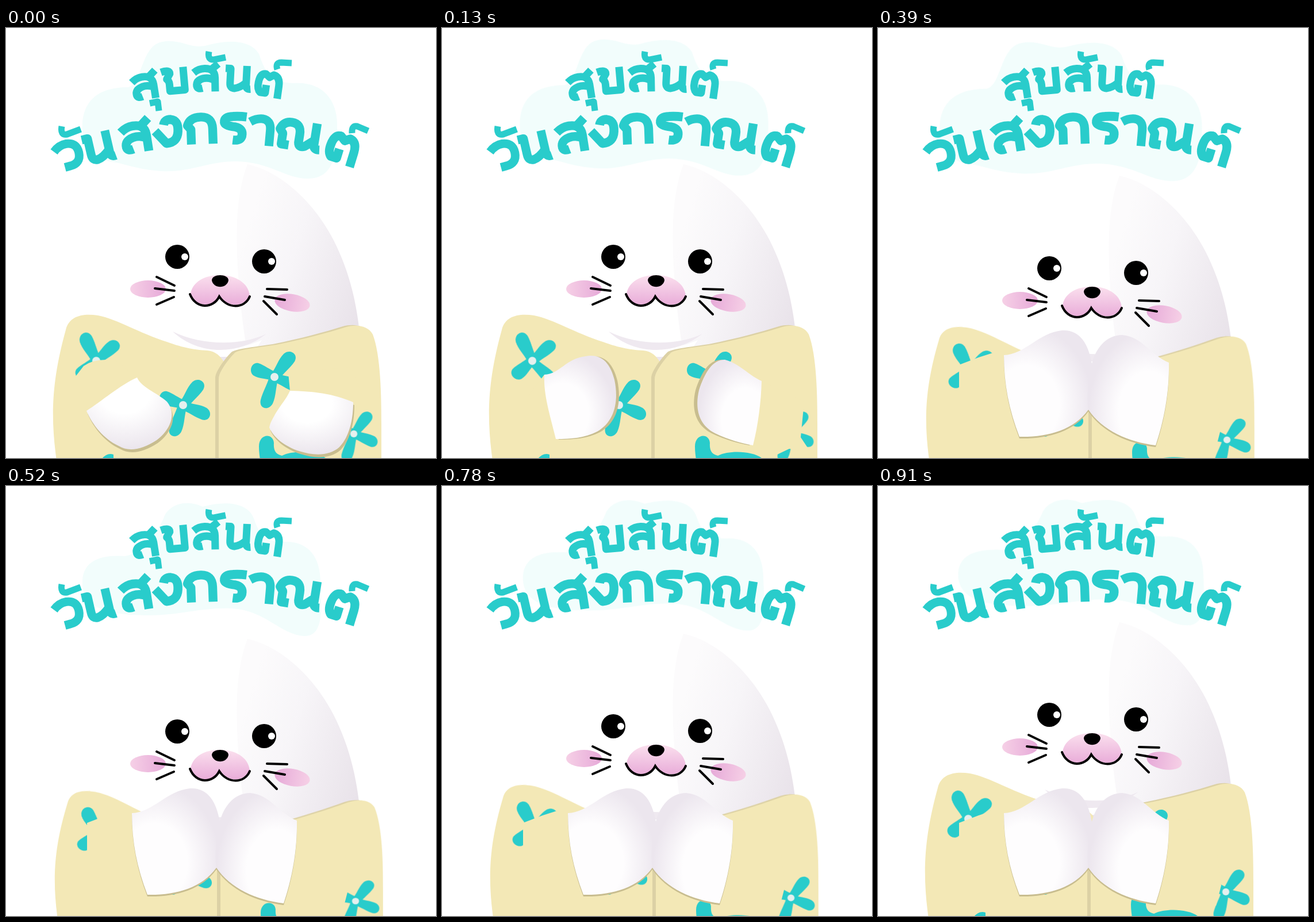
An HTML page without scripts for the animation above (1.04 s loop, 748 px wide and 748 px high).

```html
<!DOCTYPE html>
<html lang="th">
<head>
<meta charset="utf-8">
<title>สุขสันต์วันสงกราณต์</title>
<style>
html, body { margin: 0; width: 100%; height: 100%; overflow: hidden; background: #fff; }
svg { display: block; width: 100%; height: 100%; }
.anim { animation: 1040ms step-end infinite; }
.bow { animation-name: bow; }
.coat { animation-name: squash; transform-origin: 370px 925px; }
.panel-left { animation-name: droop-left; transform-origin: 130px 0; }
.panel-right { animation-name: droop-right; transform-origin: 600px 0; }
.rest { animation-name: rest; }
.lift { animation-name: lift; }
.wai { animation-name: wai; }
.cloud { fill: #f2fdfc; transform-origin: 355px 140px; }
.cloud-a { animation-name: cloud-a; }
.cloud-b { animation-name: cloud-b; }
.line { fill: none; stroke: #000; stroke-width: 4; stroke-linecap: round; }
.letters { fill: none; stroke: #29cccb; stroke-width: 13; stroke-linejoin: round; }
.marks { stroke-width: 11; }
.cloth { fill: #f3e8b6; }
.print { fill: #29cccb; }
@keyframes bow {
  0%, 87.5% { transform: none; }
  37.5%, 75% { transform: translateY(20px); }
  50%, 62.5% { transform: translateY(29px); }
}
@keyframes squash {
  0%, 87.5% { transform: none; }
  37.5%, 75% { transform: translateX(2px) scaleY(.952); }
  50%, 62.5% { transform: translateX(3px) scaleY(.927); }
}
@keyframes droop-left {
  0%, 87.5% { transform: none; }
  37.5%, 75% { transform: skewY(4deg); }
  50%, 62.5% { transform: skewY(6deg); }
}
@keyframes droop-right {
  0%, 87.5% { transform: none; }
  37.5%, 75% { transform: skewY(-4deg); }
  50%, 62.5% { transform: skewY(-4.5deg); }
}
@keyframes rest { 0% { visibility: visible; } 12.5%, 100% { visibility: hidden; } }
@keyframes lift { 0%, 25%, 100% { visibility: hidden; } 12.5% { visibility: visible; } }
@keyframes wai { 0% { visibility: hidden; } 25%, 100% { visibility: visible; } }
@keyframes cloud-a {
  0% { visibility: visible; transform: none; }
  12.5% { visibility: visible; transform: translate(-3px, -4px) scale(.975, .99); }
  25% { visibility: visible; transform: translate(3px, 2px) scale(.995, 1.015); }
  37.5% { visibility: visible; transform: translate(-19px, 3px) scale(1.03, 1.01); }
  50%, 100% { visibility: hidden; }
}
@keyframes cloud-b {
  0% { visibility: hidden; }
  50% { visibility: visible; transform: translate(-8px, 4px); }
  62.5% { visibility: visible; transform: none; }
  75% { visibility: visible; transform: translate(2px, -3px) scale(1.01, .98); }
  87.5%, 100% { visibility: visible; transform: translate(5px, -8px) scale(1.03, .945); }
}
</style>
</head>
<body>
<svg viewBox="0 0 748 748" role="img" aria-label="สุขสันต์ วันสงกราณต์">
  <defs>
    <linearGradient id="shade" gradientUnits="userSpaceOnUse" x1="402" y1="400" x2="622" y2="470">
      <stop stop-color="#fcfbfc"/><stop offset=".4" stop-color="#f7f5f8"/><stop offset="1" stop-color="#e9e3ea"/>
    </linearGradient>
    <linearGradient id="muzzle" x2="0" y2="1"><stop stop-color="#fbe0ee"/><stop offset="1" stop-color="#e9add9"/></linearGradient>
    <linearGradient id="blush"><stop stop-color="#f6d0e6"/><stop offset="1" stop-color="#e6a9d8"/></linearGradient>
    <radialGradient id="furTop" cx=".45" cy=".2" r=".85">
      <stop offset=".35" stop-color="#fff"/><stop offset="1" stop-color="#e9e3eb"/>
    </radialGradient>
    <radialGradient id="furLeft" cx=".25" cy=".7" r=".82">
      <stop offset=".45" stop-color="#fefdfe"/><stop offset=".9" stop-color="#ece6ee"/>
    </radialGradient>
    <radialGradient id="furRight" cx=".75" cy=".7" r=".82">
      <stop offset=".45" stop-color="#fefdfe"/><stop offset=".9" stop-color="#ece6ee"/>
    </radialGradient>

    <path id="blade" d="M-8 0C-7-14-14-28-12-42C-9-56 9-57 11-43C12-28 8-16 9 0Z"/>
    <g id="propeller">
      <use href="#blade" transform="rotate(38)"/>
      <use href="#blade" transform="rotate(113) scale(.95)"/>
      <use href="#blade" transform="rotate(198) scale(.95 1.07)"/>
      <use href="#blade" transform="rotate(293) scale(1 .82)"/>
      <circle r="7" fill="#e5f0ee"/>
    </g>
    <path id="flap" d="M370 810V610C370 598 388 575 398 565C405 560 420 558 470 551C520 541 560 530 592 520C610 515 630 518 638 533C652 570 653 640 653 690V810Z"/>

    <path id="so" d="M3-33Q12-40 22-40Q40-40 40-24V0M41-18Q32-25 20-23Q7-20 8-10Q9-4 18-6M32-37L46-48"/>
    <path id="wo" d="M3-33Q13-41 24-40Q40-38 39-22Q38-6 21-6H13"/>
    <path id="no" d="M0-40H9V-15Q9-6 17-6Q26-7 37-17M37-46V-12Q37-5 45-6"/>
    <path id="kho" d="M1-40Q17-44 16-36L10-27Q14-24 14-18V-6H40V-46"/>
    <path id="to" d="M21-21V-7H12Q6-12 7-24Q8-40 18-40L25-35L32-40Q43-38 43-22V0"/>
    <path id="ngo" d="M18-33Q20-41 29-40Q40-38 38-22Q36-6 20-6L5-25"/>
    <path id="ko" d="M9 0V-22L4-28Q8-40 24-40Q41-40 41-22V0"/>
    <path id="ro" d="M40-40Q30-41 20-40Q7-39 8-31Q9-26 24-25Q36-23 34-12Q32-5 21-6"/>
    <path id="aa" d="M3-34Q12-40 21-40Q34-39 34-24V0"/>
    <path id="nno" d="M20-6H9V-22L4-28Q8-40 20-40Q34-40 34-24V-12Q35-4 44-8L57-19M57-44V-12Q57-5 66-6"/>
  </defs>

  <path class="anim cloud cloud-a" d="M133 165C137 115 175 103 213 103C238 95 235 30 272 24C305 18 320 38 350 30C385 20 425 20 440 45C450 75 460 95 500 96C550 92 577 125 576 170C576 215 572 262 525 262C485 262 460 233 400 232C350 232 320 252 270 249C225 246 205 235 180 232C150 228 130 205 133 165Z"/>
  <path class="anim cloud cloud-b" d="M141 160C143 125 175 115 215 118C255 110 275 70 285 45C300 22 330 22 350 32C385 22 430 22 440 55C450 85 465 95 495 93C535 93 555 120 555 165C557 215 560 257 527 257C485 255 460 212 400 209C345 207 310 222 250 221C200 220 138 215 141 160Z"/>

  <g class="letters">
    <use href="#so" transform="translate(221 128) rotate(-9)"/>
    <use href="#kho" transform="translate(272 117) rotate(-5)"/>
    <use href="#so" transform="translate(324 111) rotate(-1)"/>
    <use href="#no" transform="translate(380 110) rotate(3)"/>
    <use href="#to" transform="translate(429 117) rotate(8)"/>
    <use href="#wo" transform="translate(90 253) rotate(-15) scale(1.15)"/>
    <use href="#no" transform="translate(142 240) rotate(-13) scale(1.16)"/>
    <use href="#so" transform="translate(202 221) rotate(-9) scale(1.18)"/>
    <use href="#ngo" transform="translate(256 210) rotate(-5) scale(1.2)"/>
    <use href="#ko" transform="translate(312 203) rotate(-2) scale(1.18)"/>
    <use href="#ro" transform="translate(369 201) rotate(2) scale(1.2)"/>
    <use href="#aa" transform="translate(418 202) rotate(5) scale(1.16)"/>
    <use href="#nno" transform="translate(467 207) rotate(9) scale(1.18)"/>
    <use href="#to" transform="translate(549 227) rotate(17) scale(1.18)"/>
    <path class="marks" d="M250 131L264 128L266 144M353 41Q350 56 362 55L382 51M97 171Q94 187 106 185L130 176M472 72Q468 60 479 60L497 61M602 183Q601 169 611 171L630 179"/>
  </g>

  <g class="anim bow">
    <path fill="url(#shade)" d="M420 237C480 250 535 305 565 360C595 415 608 470 614 520V620H430C405 500 398 380 403 320Q407 270 420 237Z"/>
    <path fill="#fff" d="M300 540Q372 575 445 543L420 580H330Z"/>
    <path fill="#efe9f0" d="M290 528C340 553 410 553 453 532C405 570 335 570 290 528Z"/>
    <path fill="#ece6ee" d="M350 572H410L379 600Z"/>
    <g fill="url(#blush)">
      <ellipse cx="247" cy="454" rx="31" ry="15"/>
      <ellipse rx="31" ry="15" transform="translate(498 478) rotate(190)"/>
    </g>
    <path fill="url(#muzzle)" d="M321 464C325 418 420 418 424 466C412 487 385 486 372 466C360 486 332 487 321 464Z"/>
    <path class="line" d="M320 463C330 489 360 489 371 467C385 489 415 489 424 467M262 433L293 448M259 453L293 457M262 481L292 468M454 454L489 455M450 467L485 473M448 475L471 498"/>
    <path d="M358 439C358 427 387 427 387 439C384 454 361 454 358 439Z"/>
    <circle cx="298" cy="398" r="21"/><circle cx="449" cy="406" r="21"/>
    <g fill="#fff"><circle cx="311" cy="398" r="6"/><circle cx="462" cy="406" r="6"/></g>
  </g>

  <g class="anim coat">
    <path class="anim cloth panel-left" d="M98 810C76 700 75 630 104 525C110 500 135 496 160 500C195 507 230 530 280 546C310 557 330 560 350 561C365 562 374 572 379 581L370 606V810Z"/>
    <g class="anim panel-right">
      <use href="#flap" x="-6" y="-1" fill="#dcd1a5"/>
      <use href="#flap" class="cloth"/>
    </g>
    <g class="print">
      <use href="#propeller" transform="translate(157 579) rotate(-63)"/>
      <use href="#propeller" transform="translate(308 656)"/>
      <use href="#propeller" transform="translate(467 607)"/>
      <use href="#propeller" transform="translate(605 706) scale(.88)"/>
      <path d="M440 728C440 705 465 704 466 722C465 736 470 742 480 744C500 734 540 736 556 748V790H452C444 765 440 745 440 728ZM166 750Q176 738 187 742V760H166Z"/>
    </g>
  </g>

  <g class="anim rest">
    <path class="cloth" d="M118 610L135 588Q155 574 190 578L228 608L140 664ZM491 600L600 590L620 640L604 651L494 631Z"/>
    <g style="filter: drop-shadow(2px 5px 0 #c8bd8f)">
      <path fill="url(#furTop)" d="M140 666C165 650 200 620 228 608C235 625 262 634 280 650C298 672 285 700 262 717C235 735 212 737 196 727C170 715 150 690 140 666Z"/>
      <path fill="url(#furTop)" d="M494 631C535 632 570 636 604 651C604 680 598 710 580 729C562 745 535 744 510 736C485 728 465 712 458 695C460 685 464 680 468 672C478 655 488 645 494 631Z"/>
    </g>
  </g>

  <g class="anim lift">
    <path class="cloth" d="M178 603L150 640L140 720L198 715ZM556 614L630 650L624 712L640 736L604 732L583 742L541 726Z"/>
    <path fill="url(#furLeft)" style="filter: drop-shadow(5px 1px 0 #c8bd8f)" d="M178 603C205 602 215 575 250 571C275 566 292 580 300 612C308 650 300 685 270 702C248 713 225 715 198 715C190 680 176 640 178 603Z"/>
    <path fill="url(#furRight)" style="filter: drop-shadow(-6px 0 0 #c8bd8f)" d="M556 614C535 605 515 582 492 577C470 577 457 600 447 630C440 660 445 690 475 705C500 717 520 722 541 726C550 690 555 650 556 614Z"/>
  </g>

  <g class="anim wai">
    <path class="cloth" d="M141 586L175 573L197 566L221 566L246 700H358V735H141ZM505 582L560 580L590 640L597 695L588 730L483 726Z"/>
    <ellipse class="print" cx="291" cy="704" rx="6" ry="7"/>
    <g style="filter: drop-shadow(0 3px 0 #c8bd8f)">
      <path fill="url(#furLeft)" d="M219 569C255 568 280 530 320 526C350 524 366 548 372 584C375 620 378 640 366 664C340 700 295 712 246 711C228 665 219 620 219 569Z"/>
      <path fill="url(#furRight)" d="M506 582C475 570 460 537 425 534C395 534 378 560 372 584C366 615 362 640 366 664C390 700 435 720 483 726C497 685 507 635 506 582Z"/>
    </g>
  </g>
</svg>
</body>
</html>
```
